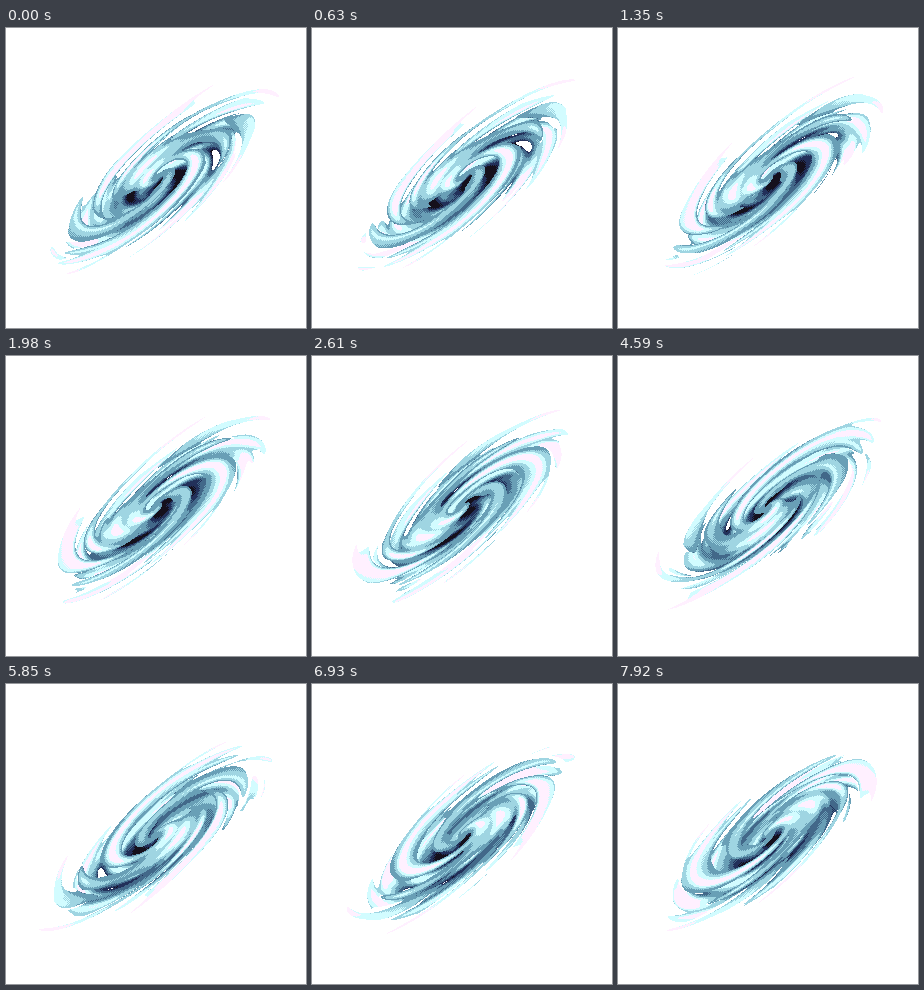
Recreate the animation shown at these times as an HTML page with a canvas. Size 300 by 300 pixels, loop 8 s.

```html
<!DOCTYPE html>
<html lang="en">
<head>
<meta charset="utf-8">
<title>Spiral galaxy</title>
<style>
  html, body { margin: 0; width: 100%; height: 100%; overflow: hidden; background: #fff; }
  canvas { display: block; width: 100vw; height: 100vh; image-rendering: pixelated; }
</style>
</head>
<body>
<canvas id="stage" width="300" height="300"></canvas>
<script>
const SIZE = 300, LOOP = 8000, STEP = 90;
const ZOOM = 1.375, TILT = 3, ROTATION = 0.674, SWIRL = -9;
const CELLS = 7, LAYERS = 4, LAYER_HEIGHT = 0.4, EDGE = 0.7, SEED = 9.88;
const TURN = 10800; // ms for a full revolution
const COLORS = ['#fff0ff', '#d2fcff', '#9fd5e2', '#699fb6', '#426889', '#22305a', '#15101c']
  .map(hex => [1, 3, 5].map(i => parseInt(hex.slice(i, i + 2), 16)));

const ctx = document.getElementById('stage').getContext('2d');
const image = ctx.createImageData(SIZE, SIZE);

// Random value per lattice corner, cached on a small grid.
const GRID = 32, OFFSET = 10;
const lattice = Float32Array.from({ length: GRID * GRID }, (_, i) => {
  const x = i % GRID - OFFSET, y = Math.floor(i / GRID) - OFFSET;
  const v = Math.sin(x * 12.9898 + y * 78.233) * 15.5453 * SEED;
  return v - Math.floor(v);
});

const smooth = t => t * t * (3 - 2 * t);
const mix = (a, b, t) => a + (b - a) * t;

function noise(x, y) {
  const ix = Math.floor(x), iy = Math.floor(y);
  const sx = smooth(x - ix), sy = smooth(y - iy);
  const i = (iy + OFFSET) * GRID + ix + OFFSET;
  return 0.5 * mix(
    mix(lattice[i], lattice[i + 1], sx),
    mix(lattice[i + GRID], lattice[i + GRID + 1], sx), sy);
}

// Noise wound around the centre, more tightly with distance.
function swirled(x, y, radius, angle, shift) {
  const a = SWIRL * Math.pow(radius, 0.4) + angle;
  const c = Math.cos(a), s = Math.sin(a);
  return noise((x * c - y * s + 0.5) * CELLS + shift, (x * s + y * c + 0.5) * CELLS + shift);
}

function draw(time) {
  const angle = 2 * Math.PI * time / TURN;
  const cos = Math.cos(ROTATION), sin = Math.sin(ROTATION);
  const data = image.data.fill(255);
  for (let py = 0; py < SIZE; py++) {
    for (let px = 0; px < SIZE; px++) {
      const dx = (px / SIZE - 0.5) * ZOOM, dy = (py / SIZE - 0.5) * ZOOM;
      const x = dx * cos - dy * sin, y = (dx * sin + dy * cos) * TILT;
      const radius = Math.hypot(x, y);
      if (radius > 1) continue;

      const layer = Math.floor(swirled(x, y, radius, angle, 0) * LAYERS) / LAYERS;
      const raisedY = y - layer * LAYER_HEIGHT;
      const raisedRadius = Math.hypot(x, raisedY);
      if (raisedRadius > EDGE) continue;

      const density = swirled(x, raisedY, raisedRadius, angle, layer * 10);
      if (density + raisedRadius > EDGE) continue;
      // A checkerboard softens the steps between shades.
      const checker = (px + py) % 2 ? 1 : 0.94;
      const shade = Math.floor(density * 2.3 * checker * COLORS.length);
      data.set(COLORS[Math.min(shade, COLORS.length - 1)], (py * SIZE + px) * 4);
    }
  }
  ctx.putImageData(image, 0, 0);
}

const began = performance.now();
let shown = -1;
function tick() {
  const elapsed = (performance.now() - began) % LOOP;
  const time = Math.floor(elapsed / STEP) * STEP;
  if (time !== shown) draw(shown = time);
  requestAnimationFrame(tick);
}
tick();
</script>
</body>
</html>
```
